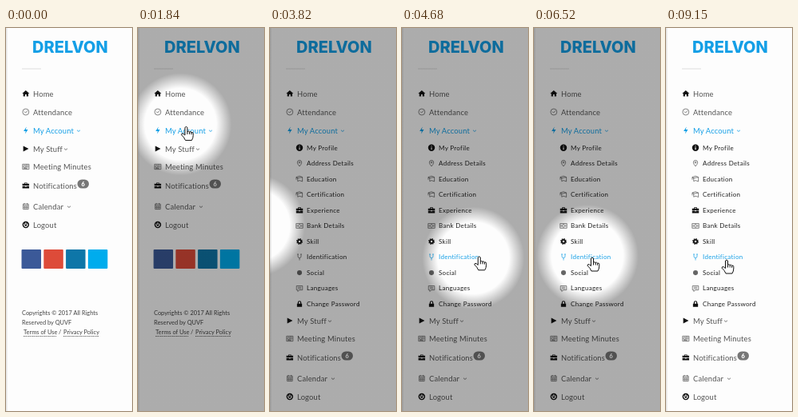
Write an HTML page that moves like this. It is 158 px wide and 479 px high and loops after 9560 ms.

```html
<!DOCTYPE html>
<html lang="en">
<head>
<meta charset="utf-8">
<title>Sidebar menu</title>
<style>
  html, body { margin: 0; width: 100%; height: 100%; overflow: hidden; background: #fdfdfd; }
  svg { display: block; font-family: Lato, sans-serif; fill: #555; }
  .main { font-size: 9.4px; letter-spacing: .18px; }
  .sub { font-size: 8px; letter-spacing: .3px; fill: #222; }
  .foot { font-size: 7.4px; letter-spacing: .03px; fill: #444; }
  .line { fill: none; stroke: #555; stroke-width: .8; }
  .solid { fill: #111; }
  .active text, .active .solid { fill: #149fe6; }
  .active .line { stroke: #149fe6; }
</style>
</head>
<body>
<svg width="158" height="479" viewBox="0 0 158 479">
  <defs>
    <radialGradient id="light" gradientUnits="userSpaceOnUse" r="64">
      <stop offset=".7" stop-opacity="0"/>
      <stop offset=".84" stop-opacity=".15"/>
      <stop offset="1" stop-opacity=".32"/>
    </radialGradient>
    <clipPath id="fold"><rect id="foldBox" y="139" width="158"/></clipPath>
  </defs>
  <rect width="1.5" height="479" fill="#e6e6e6"/>
  <text x="33" y="31" font-family="Inter, sans-serif" font-size="20" font-weight="800" fill="#149fe6">DRELVON</text>
  <path d="M20 51H44" stroke="#ddd"/>
  <g id="top"></g>
  <g id="subs" clip-path="url(#fold)"></g>
  <g id="lower">
    <g id="rest"></g>
    <rect x="89.5" y="189.5" width="14.5" height="11" rx="5.5" fill="#777"/>
    <text x="96.7" y="197.8" font-size="7.5" font-weight="900" text-anchor="middle" fill="#fff">6</text>
    <g id="tiles"></g>
    <g class="foot">
      <text x="20" y="359">Copyrights © 2017 All Rights</text>
      <text x="20" y="371">Reserved by QUVF</text>
      <text x="22" y="383">Terms of Use</text>
      <text x="66" y="383">/</text>
      <text x="72" y="383">Privacy Policy</text>
      <path d="M22 385.5H63M72 385.5H116" stroke="#444" stroke-width=".8" stroke-dasharray="1.5 1"/>
    </g>
  </g>
  <rect id="shade" width="158" height="479" fill="url(#light)"/>
  <circle id="ring" cx="58" cy="129.5" r="15.5" fill="none" stroke="#e0434c" stroke-width="3" opacity=".7"/>
  <path id="hand" fill="#fff" stroke="#111" stroke-linejoin="round"
    d="M-1.5 1Q0-1 1.5 1V6.5Q3 4.8 4.2 6.5 5.6 5.4 6.6 7.2 8.6 6.4 8.8 8.5V11Q8.8 14 7 17H-1Q-2.5 13-6 10.2-5.8 7.8-3.6 8.8L-1.5 10.6ZM1.5 6.5V9.5M4.2 6.5V9.5M6.6 7.2V9.8"/>
</svg>
<script>
const $ = id => document.getElementById(id);
const solid = d => `<path class="solid" fill-rule="evenodd" d="${d}"/>`;
const line = d => `<path class="line" d="${d}"/>`;
const disc = mark => `<circle class="solid" r="4.7"/><path d="${mark}" fill="none" stroke="#fff" stroke-width="1.3"/>`;
const CIRCLE = 'M-4.4 0A4.4 4.4 0 1 1 4.4 0A4.4 4.4 0 1 1-4.4 0Z';

const icon = {
  home: solid('M-5 0L0-4.5 5 0H3.5V4H1V1H-1V4H-3.5V0Z'),
  check: line(CIRCLE + 'M-2-.5L-.3 1.2 2.4-1.8'),
  bolt: solid('M1-5L-3 1H0L-1 5 3-1H0Z'),
  play: solid('M-3.5-4L4 0-3.5 4Z'),
  paper: line('M-4.5-3.5H4.5V3.5H-4.5ZM-3-1.7H0V1H-3ZM1.3-3.5V3.5M2-1.5H4M2 .5H4M-3 2.3H1'),
  briefcase: solid('M-4.7-2.5H-2V-4H2V-2.5H4.7V0H-4.7ZM-1-2.5H1V-3.2H-1ZM-4.7 .7H-1V1.6H1V.7H4.7V4H-4.7Z'),
  calendar: line('M-3.7-3.2H3.7V4H-3.7ZM-3.7-1H3.7M-3.7 1.5H3.7M-1.3-1V4M1.3-1V4M-2-4.5V-2.5M2-4.5V-2.5'),
  exit: disc('M0-3V0M-1.8-1.6A2.4 2.4 0 1 0 1.8-1.6'),
  info: disc('M0-2.8V-1.5M0-.5V2.7'),
  pin: line('M0 4.2Q-3 .8-3-1.2A3 3 0 0 1 3-1.2Q3 .8 0 4.2ZM-1-1.2A1 1 0 1 0 1-1.2A1 1 0 1 0-1-1.2Z'),
  cap: line('M-4.5-2.5L0-4 4-2.5V3.5L0 2-2.5 3.2V-1.2ZM-4.5-2.5L-2.5-1.2 4-2.5M-4.5-2.5V1'),
  cash: line('M-4.7-3.2H4.7V3.2H-4.7ZM-1.6 0A1.6 2 0 1 0 1.6 0A1.6 2 0 1 0-1.6 0ZM-3.2-1.5V1.5M3.2-1.5V1.5'),
  gear: `<circle class="line" r="2.4" style="stroke:#111;stroke-width:2"/><circle class="line" r="3.7" style="stroke:#111;stroke-width:1.3" stroke-dasharray="1.6 1.3"/>`,
  fork: line('M-2.2-4V-1Q-2.2 1 0 1.2V4.4M2.2-4V-1Q2.2 1 0 1.2M-3.2-4H-1.2M1.2-4H3.2'),
  dot: '<circle r="3.4" fill="#666"/>',
  chat: line('M-4.2-3.5H4.2V2.2H0L-2.5 4.2V2.2H-4.2ZM-2.5-1.6H2.5M-2.5 .3H2.5'),
  lock: solid('M-3.5-.5H-2.5V-2A2.5 2.5 0 0 1 2.5-2V-.5H3.5V4H-3.5ZM-1.2-.5H1.2V-2A1.2 1.2 0 0 0-1.2-2Z')
};

function row(kind, y, iconName, label, chevron) {
  const sub = kind === 'sub';
  const arrow = chevron ? line(`M${chevron - 2} ${y - .3}l2 1.8 2-1.8`) : '';
  return `<g class="${kind}${label === 'My Account' ? ' active' : ''}">
    <g transform="translate(${sub ? 37 : 24.8} ${y}) scale(.9)">${icon[iconName]}</g>
    <text x="${sub ? 46 : 34}" y="${y + (sub ? 2.8 : 3.8)}">${label}</text>${arrow}</g>`;
}
const fill = (id, rows) => { $(id).innerHTML = rows.join(''); };

fill('top', [
  row('main', 82, 'home', 'Home'),
  row('main', 105, 'check', 'Attendance'),
  row('main', 128, 'bolt', 'My Account', 91)
]);
fill('rest', [
  row('main', 151, 'play', 'My Stuff', 75),
  row('main', 173.5, 'paper', 'Meeting Minutes'),
  row('main', 197, 'briefcase', 'Notifications'),
  row('main', 223, 'calendar', 'Calendar', 79),
  row('main', 246, 'exit', 'Logout')
]);
const subY = i => 149.7 + 19.55 * i;
fill('subs', [
  ['info', 'My Profile'], ['pin', 'Address Details'], ['cap', 'Education'], ['cap', 'Certification'],
  ['briefcase', 'Experience'], ['cash', 'Bank Details'], ['gear', 'Skill'], ['fork', 'Identification'],
  ['dot', 'Social'], ['chat', 'Languages'], ['lock', 'Change Password']
].map(([name, label], i) => row('sub', subY(i), name, label)));
fill('tiles', ['#3b5998', '#dd4b39', '#0e76a8', '#00aced'].map((color, i) =>
  `<rect x="${19.5 + 27.8 * i}" y="277" width="24.5" height="24" rx="1" fill="${color}"/>`));

// time, pointer x, y, spotlight x, y
const path = [
  [700, 235, 226, 235, 222], [1140, 64, 120, 55, 119], [1710, 61, 123, 54, 120],
  [2600, 57, 126, 50, 122], [3550, 57, 126, 50, 122], [3820, -18, 244, -20, 247],
  [3950, -18, 246, -20, 249], [4550, 97, 286, 90, 288], [5240, 96, 285, 87, 286],
  [5820, 95, 284, 86, 285], [6520, 73, 287, 67, 285], [7340, 71, 288, 66, 285],
  [9149, 71, 288, 66, 285], [9150, 76, 290, 66, 285]
];
const dimming = [[20, 0], [310, 1], [8400, 1], [8560, 0]];

function sample(keys, t) {
  const next = keys.findIndex(k => k[0] > t);
  if (next < 1) return keys.at(next).slice(1);
  const a = keys[next - 1], b = keys[next], p = (t - a[0]) / (b[0] - a[0]);
  return a.slice(1).map((v, i) => v + (b[i + 1] - v) * p);
}

function draw(now) {
  const t = now % 9560;
  const [x, y, lightX, lightY] = sample(path, t);
  const open = t < 2600 ? 0 : t < 2950 ? 30 : t < 3080 ? 130 : 215;

  $('foldBox').setAttribute('height', open);
  $('lower').setAttribute('transform', `translate(0 ${open})`);
  [...$('subs').children].forEach((item, i) =>
    item.classList.toggle('active', open === 215 && x > 30 && Math.abs(y - subY(i)) < 9.7));

  $('light').setAttribute('cx', lightX);
  $('light').setAttribute('cy', lightY);
  $('shade').setAttribute('opacity', sample(dimming, t)[0]);
  $('hand').setAttribute('transform', `translate(${x} ${y})`);
  $('ring').setAttribute('visibility', t >= 2470 && t < 2950 ? 'visible' : 'hidden');
  requestAnimationFrame(draw);
}
requestAnimationFrame(draw);
</script>
</body>
</html>
```
